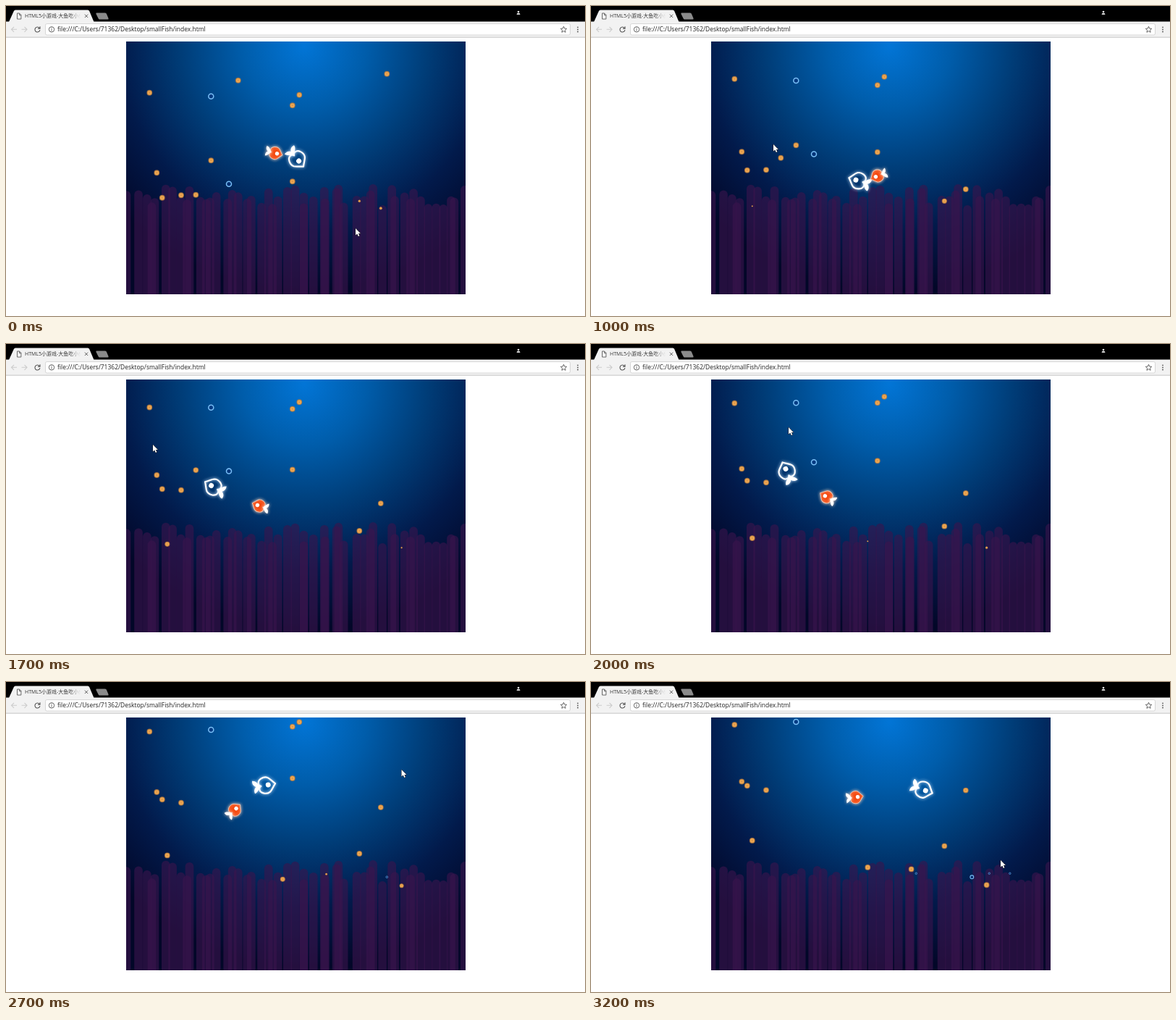
Recreate the animation shown at these times as an HTML page with a canvas. Size 800 px wide and 428 px high, loop 3300 ms.

```html
<!DOCTYPE html>
<html lang="zh">
<head>
<meta charset="utf-8">
<title>HTML5小游戏</title>
<style>
  html, body { margin: 0; width: 100%; height: 100%; overflow: hidden; background: #fff; }
  svg, canvas { position: absolute; left: 0; top: 0; width: 800px; height: 428px; }
  text { font-family: "Open Sans", "Noto Sans", "Noto Sans CJK SC", "Noto Sans CJK", sans-serif; }
</style>
</head>
<body>
<svg viewBox="0 0 800 428">
  <defs>
    <linearGradient id="fade" gradientUnits="userSpaceOnUse" x1="88" x2="103">
      <stop offset="0" stop-color="#333"/>
      <stop offset="1" stop-color="#333" stop-opacity="0"/>
    </linearGradient>
    <clipPath id="tabClip"><path d="M26 6h77v16h-77z"/></clipPath>
  </defs>
  <path d="M0 0h800v22H0z"/>
  <path d="M0 21.500h800v21.500H0z" fill="#f2f2f2"/>
  <path d="M0 43.200h800" stroke="#b8b8b8" stroke-width=".8"/>
  <path d="M4 22L10.800 7Q11.500 5.500 13 5.500H113Q114.500 5.500 115.200 7L121.500 22z" fill="#f2f2f2"/>
  <path d="M125 9.500h12q1.500 0 2 1.500l2.500 6q.5 1.500-1 1.500h-11q-1.500 0-2-1.500l-3-6q-.5-1.500.5-1.500z" fill="#8b8b8b"/>
  <g fill="none" stroke="#555" stroke-width=".9">
    <path d="M15.500 10h3l2.300 2.300v5.700h-5.300zM18.300 10v2.600h2.500" fill="#fff"/>
    <path d="M108.800 11.600l4.400 4.400m0-4.400l-4.400 4.400"/>
  </g>
  <text x="26" y="16.400" font-size="7" fill="url(#fade)" clip-path="url(#tabClip)">HTML5小游戏-大鱼吃小鱼</text>
  <g fill="#fff"><circle cx="708" cy="8" r="1.300"/><path d="M705.500 11.700q0-2 2.500-2t2.500 2z"/></g>
  <rect x="54.500" y="24.500" width="725" height="15.500" rx="2" fill="#fff" stroke="#c9c9c9" stroke-width=".7"/>
  <g fill="none" stroke="#ccc" stroke-width="1.100">
    <path d="M15 32.300H7.500m3.500-3.500l-3.500 3.500 3.500 3.500M21.500 32.300H29m-3.500-3.500l3.500 3.500-3.500 3.500"/>
    <path d="M46.200 30.300a3.500 3.500 0 1 0 .7 2.800M47 28.300v2.800h-2.900" stroke="#555"/>
  </g>
  <g fill="none" stroke="#555" stroke-width=".9">
    <circle cx="63" cy="32.300" r="3.700"/>
    <path d="M63 31.700v2.700M63 29.900v1"/>
    <path d="M770.500 28.200l1.200 2.800 3 .3-2.300 2 .7 3-2.600-1.600-2.600 1.600.7-3-2.300-2 3-.3z"/>
  </g>
  <g fill="#555"><circle cx="790" cy="29.300" r=".9"/><circle cx="790" cy="32.400" r=".9"/><circle cx="790" cy="35.500" r=".9"/></g>
  <text x="71" y="35.200" font-size="8.470" fill="#222">file:///C:/Users/71362/Desktop/smallFish/index.html</text>
</svg>
<canvas id="stage"></canvas>
<script>
const LOOP = 3300, STEP = 100;
const SEA = { x: 166, y: 49, w: 469, h: 349 };
const UNIT = 0.5855; // screen pixels per game unit
const ratio = Math.max(1, window.devicePixelRatio || 1);

function makeLayer(canvas) {
  canvas.width = 800 * ratio;
  canvas.height = 428 * ratio;
  const ctx = canvas.getContext('2d');
  ctx.scale(ratio, ratio);
  return ctx;
}
const g = makeLayer(document.getElementById('stage'));

function seeded(seed) {
  return () => (seed = (seed * 16807) % 2147483647) / 2147483647;
}

function paintSea() {
  const layer = document.createElement('canvas');
  const c = makeLayer(layer);
  c.beginPath();
  c.rect(SEA.x, SEA.y, SEA.w, SEA.h);
  c.clip();
  const glow = c.createRadialGradient(412, 55, 0, 412, 55, 340);
  ['#0275d6', '#005dab', '#003d78', '#021a4b', '#020728']
    .forEach((color, i) => glow.addColorStop(i / 4, color));
  c.fillStyle = glow;
  c.fillRect(SEA.x, SEA.y, SEA.w, SEA.h);

  const random = seeded(4711);
  c.globalAlpha = 0.6;
  c.strokeStyle = '#3b154e';
  c.lineWidth = 20 * UNIT;
  c.lineCap = 'round';
  for (let i = 0; i < 50; i++) {
    const x = SEA.x + (i * 16 + random() * 20) * UNIT;
    const height = (200 + random() * 50) * UNIT;
    c.beginPath();
    c.moveTo(x, 410);
    c.lineTo(x, SEA.y + SEA.h - height);
    c.stroke();
  }
  return layer;
}
const sea = paintSea();

// Food grows on the weed, then floats up: x, y, speed in px/s, time it lets go in s
const FULL = 14 * UNIT;
const makeFood = blue => ([x, y, speed, rise = 0]) => ({ x, y, speed, rise, blue, eaten: Infinity });
const food = [
  ...[
    [198, 119.5, 19], [320.5, 102.5, 52], [395.5, 137, 28], [405, 122.5, 25], [526, 93.5, 48],
    [283, 213, 21], [208, 230, 29], [215.5, 264.5, 38], [241.7, 261, 35], [262, 260.5, 51], [395.5, 242, 40.5],
    [488, 269, 21, 1.16], [517.5, 279, 47, 0.44], [222.5, 276, 41, 1.8],
    [546.3, 281, 22, 3.15], [382, 272, 41, 2.8], [442.3, 265, 69, 3.1]
  ].map(makeFood(false)),
  ...[[283, 124.5, 21.8], [307.7, 245.5, 41.3], [526, 269, 27.5, 3.7]].map(makeFood(true)),
  ...[449, 550, 578.5].map(x => makeFood(true)([x, 264, 38, 3.95]))
];
const heightAt = (f, t) => f.y - f.speed * Math.max(0, t - f.rise);
const sizeAt = (f, t) => FULL - f.speed / 5.5 * Math.max(0, f.rise - t);

// Pointer path: time in s, x, y
const POINTER = [
  [0, 483, 307], [0.25, 470, 322], [0.5, 389.5, 270], [0.75, 298, 230], [1, 252, 191], [1.4, 225, 165],
  [1.7, 203, 139], [2, 273, 115], [2.7, 546.5, 121], [2.95, 600, 128], [3.2, 566, 246]
];

// Smooth curve through unevenly timed keys
function sample(keys, t) {
  const last = keys.length - 1;
  let i = 0;
  while (i < last - 1 && t > keys[i + 1][0]) i++;
  const a = keys[i], b = keys[i + 1], span = b[0] - a[0];
  const u = Math.min(1, (t - a[0]) / span);
  const slope = (k, n) => {
    const p = keys[Math.max(0, k - 1)], q = keys[Math.min(last, k + 1)];
    return (q[n] - p[n]) / (q[0] - p[0]) * span;
  };
  const u2 = u * u, u3 = u2 * u;
  const mix = n => (2 * u3 - 3 * u2 + 1) * a[n] + (u3 - 2 * u2 + u) * slope(i, n) +
    (3 * u2 - 2 * u3) * b[n] + (u3 - u2) * slope(i + 1, n);
  return { x: mix(1), y: mix(2) };
}

const heading = (from, to) => Math.atan2(to.y - from.y, to.x - from.x);

function chase(fish, goal, pull, turn, dt) {
  const delta = heading(fish, goal) - fish.angle;
  fish.angle += Math.atan2(Math.sin(delta), Math.cos(delta)) * Math.min(1, turn * dt);
  fish.x += (goal.x - fish.x) * pull * dt;
  fish.y += (goal.y - fish.y) * pull * dt;
}

// The big fish follows the pointer, the small one follows the big one
function swim() {
  const big = { x: 402, y: 211 }, small = { x: 371.5, y: 203 };
  big.angle = heading(big, sample(POINTER, 0));
  small.angle = heading(small, big);
  const poses = [], dt = 0.01, perPose = STEP / 1000 / dt;
  for (let i = 0; i < LOOP / 1000 / dt; i++) {
    const t = i * dt;
    const mouth = { x: big.x + 8 * Math.cos(big.angle), y: big.y + 8 * Math.sin(big.angle) };
    for (const f of food) {
      const near = Math.hypot(f.x - mouth.x, heightAt(f, t) - mouth.y) < 18;
      if (near && t >= f.rise) f.eaten = Math.min(f.eaten, t);
    }
    if (i % Math.round(perPose) === 0) poses.push({ big: { ...big }, small: { ...small } });
    chase(big, sample(POINTER, t), 1.17, 8, dt);
    chase(small, big, 1.3, 20, dt);
  }
  return poses;
}
const poses = swim();

function disc(x, y, r, fill, stroke, width) {
  g.beginPath();
  g.arc(x, y, r, 0, Math.PI * 2);
  if (fill) { g.fillStyle = fill; g.fill(); }
  if (stroke) { g.strokeStyle = stroke; g.lineWidth = width; g.stroke(); }
}

function drawFood(f, t) {
  const y = heightAt(f, t) + 0.3, x = f.x + 0.3, r = sizeAt(f, t) / 2;
  if (t >= f.eaten || y < 54.3 || r < 0.35) return;
  if (f.blue) {
    disc(x, y, r * 0.85, 'rgba(5,50,125,.6)', '#78bdf5', r * 0.38);
  } else {
    disc(x, y, r * 0.8, '#f3ae57', 'rgba(190,125,60,.75)', r * 0.32);
    disc(x, y, r * 0.36, '#e19a4b');
  }
}

const bodyPath = new Path2D('M14 0C10 -4 8 -8 5 -10C0 -13 -9 -10 -9 -4Q-9 -1 -6 0Q-9 1 -9 4C-9 10 0 13 5 10C8 8 10 4 14 0Z');
const tailPath = new Path2D('M1 0C-2 -5 -5 -9 -9 -9C-10 -4 -8 -2 -5 0C-8 2 -9 5 -8 9C-5 8 -2 5 1 0Z');

function drawFish({ x, y, angle }, scale, color, t) {
  g.save();
  g.translate(x, y);
  g.rotate(angle);
  g.scale(scale, scale);
  g.shadowColor = color ? '#ffd9c4' : '#cfe6ff';
  g.shadowBlur = 4 * ratio;
  g.strokeStyle = color ? '#f0c9b5' : '#fff';
  g.lineWidth = color ? 1.2 : 2.2;
  g.lineJoin = 'round';
  if (color) { g.fillStyle = color; g.fill(bodyPath); }
  g.stroke(bodyPath);
  g.save();
  g.translate(-8, 0);
  g.rotate(Math.sin(t * 14) * 0.15);
  g.fillStyle = '#fff';
  g.fill(tailPath);
  g.restore();
  g.shadowBlur = 0;
  disc(4, 0, 3.5, '#fff');
  g.restore();
}

const arrow = new Path2D('M0 0V9.5L2.2 7.5L3.8 11L5.4 10.3L3.9 6.9H6.8Z');

function drawPointer({ x, y }) {
  g.save();
  g.translate(x, y);
  g.lineWidth = 1;
  g.strokeStyle = '#111';
  g.fillStyle = '#fff';
  g.stroke(arrow);
  g.fill(arrow);
  g.restore();
}

function draw(index) {
  const t = index * STEP / 1000;
  g.clearRect(0, 0, 800, 428);
  g.drawImage(sea, 0, 0, 800, 428);
  food.forEach(f => drawFood(f, t));
  drawFish(poses[index].big, 1, null, t);
  drawFish(poses[index].small, 0.77, '#f4480e', t);
  drawPointer(sample(POINTER, t));
}

const start = performance.now();
function tick() {
  draw(Math.floor((performance.now() - start) % LOOP / STEP));
  requestAnimationFrame(tick);
}
tick();
</script>
</body>
</html>
```
